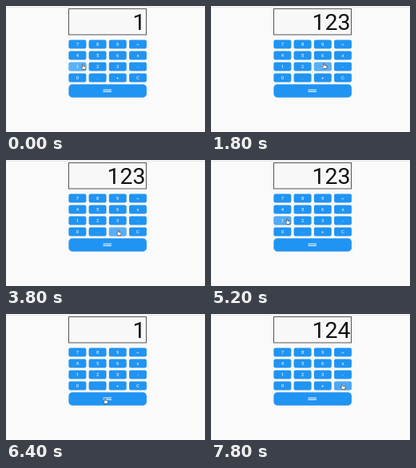
These frames come from a looping animation (249x158 px, 8 s). An HTML page:

```html
<!DOCTYPE html>
<html lang="en">
<head>
<meta charset="utf-8">
<title>Calculator</title>
<style>
  html, body { margin: 0; height: 100%; overflow: hidden; background: #fafafa; }
  svg { display: block; width: 100vw; height: 100vh; }
  text { font-family: Roboto, sans-serif; }
  .key { fill: #2094f3; }
  .shade { fill: #1b6fb5; opacity: .35; }
  .glow { fill: #fff; opacity: 0; }
  .label { fill: #fff; font-size: 6px; text-anchor: middle; }
  #display { fill: #111; font-size: 28.5px; text-anchor: end; }
</style>
</head>
<body>
<svg viewBox="0 0 249 158">
  <rect width="249" height="158" fill="#fafafa"/>
  <path d="M0 1.5H249" stroke="#dedede" stroke-width=".8"/>
  <rect x="78.5" y="3.5" width="97" height="32.5" fill="#f8f8f8" stroke="#555"/>
  <text id="display" x="174.5" y="30.3"></text>
  <g id="keys"></g>
  <path d="M121.5 105.2h10.5m-10.5 2.2h10.5" stroke="#fff" stroke-width="1"/>
  <path id="hand" fill="#fff" stroke="#222" stroke-width=".6" stroke-linejoin="round"
    d="M-1.4 .6V-2.6q.7-1 1.3 0V-.8l2.5.5q.8.2.7 1L2.6 3.6H-1L-2.8 .9q.2-1 1.4-.3"/>
</svg>
<script>
const LOOP = 8000, STEP = 200;
const $ = id => document.getElementById(id);
const glows = {};

function svg(tag, attrs, text = '') {
  const el = document.createElementNS('http://www.w3.org/2000/svg', tag);
  for (const name in attrs) el.setAttribute(name, attrs[name]);
  el.textContent = text;
  return $('keys').appendChild(el);
}

function addKey(name, x, y, width, height, rx) {
  const box = { x, y, width, height, rx };
  svg('rect', { ...box, y: y + .6, class: 'shade' });
  svg('rect', { ...box, class: 'key' });
  glows[name] = svg('rect', { ...box, class: 'glow' });
  if (name !== '=') svg('text', { x: x + width / 2, y: y + 7.7, class: 'label' }, name);
}

[...'789÷456x123-0.+C'].forEach((name, i) =>
  addKey(name, 78.5 + i % 4 * 25.2, 42.4 + (i >> 2) * 14, 21.8, 10.8, 2));
addKey('=', 78.5, 98.2, 97.4, 16.2, 4.5);

// time, x, y
const path = [
  [0, 97, 76], [200, 97, 76], [400, 123, 76], [1000, 123, 76], [1400, 142, 75],
  [2600, 142, 75], [3400, 141, 91], [4400, 141, 91], [5000, 96, 77], [5400, 96, 77],
  [5800, 124, 109], [6800, 125, 109], [7000, 125, 109], [7600, 165, 91], [8000, 165, 91]
];
// key, time pressed, time released, strength
const presses = [
  ['1', -200, 400, .27], ['2', 800, 1200, .27], ['3', 1600, 2200, .25],
  ['+', 3600, 4000, .25], ['1', 5200, 5600, .22], ['=', 6600, 7200, .18],
  ['C', 7800, 8200, .2]
];
const readings = [[0, '1'], [800, '12'], [1600, '123'], [5400, '1'], [6600, '124']];

function draw(t) {
  const i = path.findIndex(p => p[0] > t);
  const [t0, x0, y0] = path[i - 1], [t1, x1, y1] = path[i];
  const k = (t - t0) / (t1 - t0);
  $('hand').setAttribute('transform', `translate(${x0 + (x1 - x0) * k} ${y0 + (y1 - y0) * k})`);

  for (const name in glows) glows[name].style.opacity = 0;
  for (const [name, start, end, strength] of presses)
    if (t >= start && t < end)
      glows[name].style.opacity = strength * Math.min(1, (end - t) / STEP);

  $('display').textContent = readings.filter(r => r[0] <= t).pop()[1];
}

function frame() {
  draw(Math.floor(performance.now() % LOOP / STEP) * STEP);
  requestAnimationFrame(frame);
}
frame();
</script>
</body>
</html>
```
